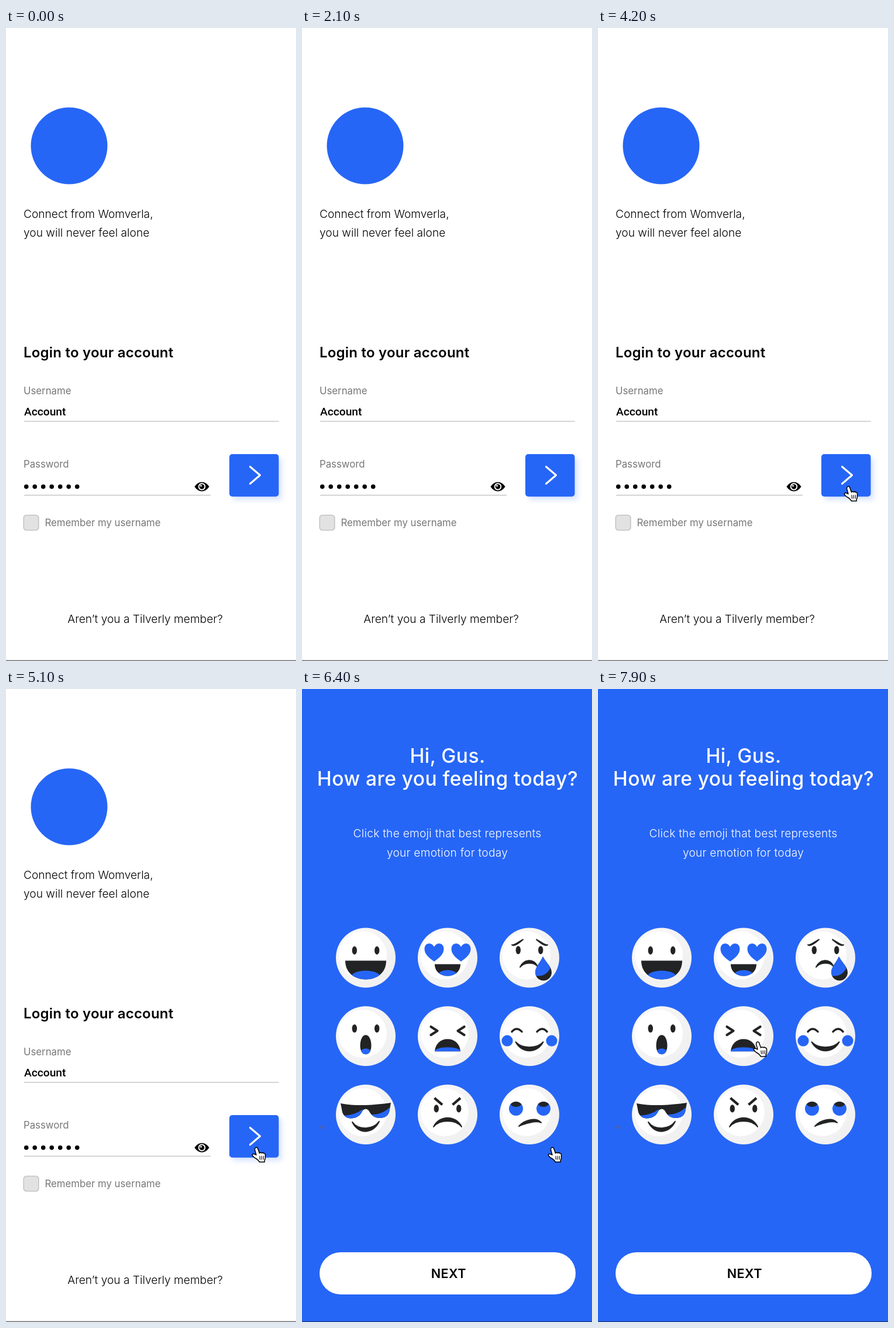
Write an HTML page with a canvas that moves like this. It is 496 px wide and 1080 px high and loops after 8 s.

```html
<!DOCTYPE html>
<html lang="en">
<head>
<meta charset="utf-8">
<title>Mood check-in</title>
<style>
html, body { margin: 0; width: 100%; height: 100%; overflow: hidden; background: #fff; }
canvas, svg { position: absolute; left: 0; top: 0; width: 496px; height: 1080px; }
text { font-family: Inter, "Open Sans", sans-serif; }
.body { font-size: 19.17px; font-weight: 300; }
.label { font-size: 16.77px; fill: #777; }
.title { font-size: 23.96px; font-weight: 600; letter-spacing: .01em; }
.input { font: 500 19.17px Roboto, Inter, sans-serif; }
.head { font-size: 33.54px; font-weight: 500; letter-spacing: .013em; }
.next { font-size: 21.56px; font-weight: 600; letter-spacing: .02em; fill: #000; }
#mood { fill: #fff; text-anchor: middle; }
#mood .body { letter-spacing: .013em; }
</style>
</head>
<body>
<canvas id="stage"></canvas>
<svg viewBox="0 0 496 1080">
  <g id="login">
    <text class="body" x="30" y="323.5">Connect from Womverla,</text>
    <text class="body" x="30" y="356">you will never feel alone</text>
    <text class="title" x="30" y="561.5">Login to your account</text>
    <text class="label" x="30" y="624.5">Username</text>
    <text class="input" x="31" y="661">Account</text>
    <text class="label" x="30" y="750">Password</text>
    <text class="label" x="66.5" y="850">Remember my username</text>
    <text class="body" x="238" y="1015" text-anchor="middle">Aren’t you a Tilverly member?</text>
  </g>
  <g id="mood">
    <text class="head" x="249" y="125.5">Hi, Gus.</text>
    <text class="head" x="249" y="165">How are you feeling today?</text>
    <text class="body" x="248.5" y="253">Click the emoji that best represents</text>
    <text class="body" x="248.5" y="286">your emotion for today</text>
    <text class="next" x="250.8" y="1005">NEXT</text>
  </g>
</svg>
<script>
const BLUE = '#2666f6', DARK = '#222324';
const LOOP = 8000, SWITCH = 5150;
const canvas = document.getElementById('stage');
const login = document.getElementById('login');
const mood = document.getElementById('mood');
const ctx = canvas.getContext('2d');
const dpr = window.devicePixelRatio || 1;
canvas.width = 496 * dpr;
canvas.height = 1080 * dpr;

function fill(path, color) {
  ctx.fillStyle = color;
  ctx.fill(new Path2D(path));
}

function stroke(path, color, width, cap = 'round') {
  ctx.strokeStyle = color;
  ctx.lineWidth = width;
  ctx.lineCap = cap;
  ctx.lineJoin = 'round';
  ctx.stroke(new Path2D(path));
}

function oval(x, y, rx, ry, color) {
  ctx.fillStyle = color;
  ctx.beginPath();
  ctx.ellipse(x, y, rx, ry, 0, 0, Math.PI * 2);
  ctx.fill();
}

const dot = (x, y, r, color) => oval(x, y, r, r, color);

function box(x, y, w, h, r, color) {
  ctx.fillStyle = color;
  ctx.beginPath();
  ctx.roundRect(x, y, w, h, r);
  ctx.fill();
}

function at(x, y, draw) {
  ctx.save();
  ctx.translate(x, y);
  draw();
  ctx.restore();
}

// Fills a shape, then paints more inside its outline.
function masked(path, color, draw) {
  ctx.save();
  fill(path, color);
  ctx.clip(new Path2D(path));
  draw();
  ctx.restore();
}

// Round arc with its middle at height my, thick there and thin at both ends.
function crescent(x0, y0, my, x1, y1, w) {
  const inset = (x1 - x0) * .22, lift = (my - (y0 + y1) / 2) * 4 / 3;
  const a = x0 + inset, b = x1 - inset, d = w * 2 / 3;
  const ya = y0 + lift, yb = y1 + lift;
  const path = `M${x0} ${y0}C${a} ${ya - d} ${b} ${yb - d} ${x1} ${y1}` +
    `C${b} ${yb + d} ${a} ${ya + d} ${x0} ${y0}Z`;
  fill(path, DARK);
  stroke(path, DARK, 2);
}

function eyes(x, y, ry = 7) {
  oval(-x, y, 4.2, ry, DARK);
  oval(x, y, 4.2, ry, DARK);
}

function heart(x) {
  at(x, -9, () => fill('M0 15.5C-9 9-16.5 3-16.5-6C-16.5-17-4-18 0-9.5C4-18 16.5-17 16.5-6C16.5 3 9 9 0 15.5Z', BLUE));
}

const faces = [
  function grin() {
    eyes(19.2, -12.5);
    masked('M-35 5H35C35 25 20 37 0 37C-20 37-35 25-35 5Z', DARK,
      () => oval(0, 34, 26, 12, BLUE));
  },
  function love() {
    heart(-23);
    heart(23);
    masked('M-22 11H22C22 23 13 31 0 31C-13 31-22 23-22 11Z', DARK,
      () => oval(0, 30, 17, 9, BLUE));
  },
  function crying() {
    crescent(-30, -22, -24.5, -11, -31, 1.6);
    crescent(12, -31, -24.5, 31, -22, 1.6);
    eyes(19.2, -13);
    crescent(-16, 16, 7, 14, 15, 4.5);
    masked('M23-2C28 8 38 15 38 25A14 14 0 0 1 10 25C10 15 19 8 23-2Z', DARK,
      () => dot(16, 10, 21, BLUE));
  },
  function surprised() {
    eyes(19.2, -13);
    masked('M0-2C6-2 9.5 7 9.5 16C9.5 25 6 31 0 31C-6 31-9.5 25-9.5 16C-9.5 7-6-2 0-2Z', DARK,
      () => oval(0, 30, 10, 9, BLUE));
  },
  function upset() {
    stroke('M-28.5-16L-17.5-9L-28.5-2M28.5-16L17.5-9L28.5-2', DARK, 4.2);
    masked('M-22 26C-21 13-12 5 0 5C12 5 21 13 22 26Z', DARK,
      () => oval(0, 27, 23, 8, BLUE));
  },
  function blushing() {
    stroke('M-30-7.5Q-22-17-13-7.5M30-7.5Q22-17 13-7.5', DARK, 3.4);
    dot(-38, 8, 9.6, BLUE);
    dot(38, 8, 9.6, BLUE);
    crescent(-23.5, 10, 22, 23.5, 10, 6);
  },
  function cool() {
    masked('M-43-19Q-20-15 0-16Q20-17 43-20L41-9C40 1 34 6 24 6C13 6 8-1 5-7Q0-12-5-7C-9 1-14 6-24 6.5C-34 7-40 1-41-9Z', DARK, () => {
      fill('M-40 2Q-20 2-5-9L-8 8H-40ZM11 0Q29 0 43-14V8H11Z', BLUE);
    });
    crescent(-23, 13, 26, 23, 12, 5.5);
  },
  function angry() {
    stroke('M-22.5-28L-9-16.5M22-28L8.5-16.5', DARK, 4.4, 'butt');
    eyes(19.2, -10, 6.6);
    crescent(-24, 21, 8.5, 24, 21, 5.5);
  },
  function eyeRoll() {
    for (const x of [-23, 24]) {
      at(x, -10, () => masked('M-12 0A12 12 0 1 1 12 0A12 12 0 1 1-12 0Z', BLUE,
        () => oval(0, -9, 9.5, 6, DARK)));
    }
    crescent(-18, 20, 11.5, 20, 14, 4.5);
  }
];

function plate() {
  const shade = ctx.createLinearGradient(-40, -40, 40, 40);
  shade.addColorStop(0, '#f8f7f8');
  shade.addColorStop(1, '#f0f0f0');
  dot(0, 0, 51, shade);
  dot(-5, -4, 41, '#fff');
}

function drawLogin() {
  ctx.fillStyle = '#fff';
  ctx.fillRect(0, 0, 496, 1080);
  dot(108, 201, 65.5, BLUE);

  stroke('M31 671.2H466.5M31 797.2H350', '#bdbdbd', 1.3, 'butt');
  for (let i = 0; i < 7; i++) dot(34.7 + i * 14.5, 782.6, 3.8, '#000');

  at(335, 782.5, () => {
    fill('M-12.5 0C-6-10.5 6-10.5 12.5 0C6 10.5-6 10.5-12.5 0Z', '#000');
    dot(0, 0, 6.2, '#fff');
    dot(0, 0, 4.3, '#000');
    dot(-1.5, -1.5, 1.5, '#fff');
  });

  ctx.save();
  ctx.shadowColor = 'rgba(38,102,246,.17)';
  ctx.shadowBlur = 8 * dpr;
  ctx.shadowOffsetX = 5 * dpr;
  ctx.shadowOffsetY = 6 * dpr;
  box(382, 727, 84.5, 72.5, 5, BLUE);
  ctx.restore();
  stroke('M417.5 748.5L434.5 763L417.5 777.5', '#fff', 3.2);

  box(29.5, 830.5, 27, 27, 5.5, '#bcbcbc');
  box(30.8, 831.8, 24.4, 24.4, 4.5, '#e2e2e2');
  ctx.fillStyle = '#777';
  ctx.fillRect(0, 1078.5, 496, 1.5);
}

function drawMood() {
  ctx.fillStyle = BLUE;
  ctx.fillRect(0, 0, 496, 1080);
  faces.forEach((face, i) => {
    at(109 + i % 3 * 140, 458.5 + Math.floor(i / 3) * 133.7, () => {
      plate();
      face();
    });
  });
  dot(34.5, 747.5, 3.2, '#4963ae');
  box(30, 961, 438, 72, 36, '#fff');
  ctx.fillStyle = '#173a86';
  ctx.fillRect(0, 1078.7, 496, 1.3);
}

function arrow() {
  const path = 'M0 0V22L5 17.6L9 27L12.6 25.4L8.7 16.4L15.5 16Z';
  stroke(path, '#fff', 2.4);
  fill(path, '#000');
}

function hand() {
  const path = 'M-2 .8Q0-1 2 1.5L5 10Q7 8 9 9.8Q11 8.3 12.6 10.3Q15 10 15 13V18Q15 20 13.7 22V25H5Q2 20-3 18Q-8 14-7 12Q-5 10-.5 13L-3 4Q-3.2 2-2 .8Z';
  fill(path, '#fff');
  stroke(path, '#000', 1.5);
  stroke('M5.5 15L6 20.5M8.7 15V20.5M11.8 15V20.5', '#000', 1.1);
}

// Eased progress between two times.
function ease(t, from, to) {
  const p = Math.min(1, Math.max(0, (t - from) / (to - from)));
  return p * p * (3 - 2 * p);
}

const mix = (a, b, p) => a + (b - a) * p;

function drawCursor(t) {
  if (t < 2900) return;
  if (t < 4000) {
    const p = ease(t, 2900, 3250);
    at(mix(472, 431, p), mix(813, 779.5, p), arrow);
  } else {
    const p = ease(t, 7000, 7750);
    at(mix(428.5, 273.5, p), mix(782, 602, p), hand);
  }
}

function frame() {
  const t = performance.now() % LOOP;
  const onLogin = t < SWITCH;
  ctx.setTransform(dpr, 0, 0, dpr, 0, 0);
  if (onLogin) drawLogin(); else drawMood();
  login.style.display = onLogin ? '' : 'none';
  mood.style.display = onLogin ? 'none' : '';
  drawCursor(t);
  requestAnimationFrame(frame);
}
frame();
</script>
</body>
</html>
```
